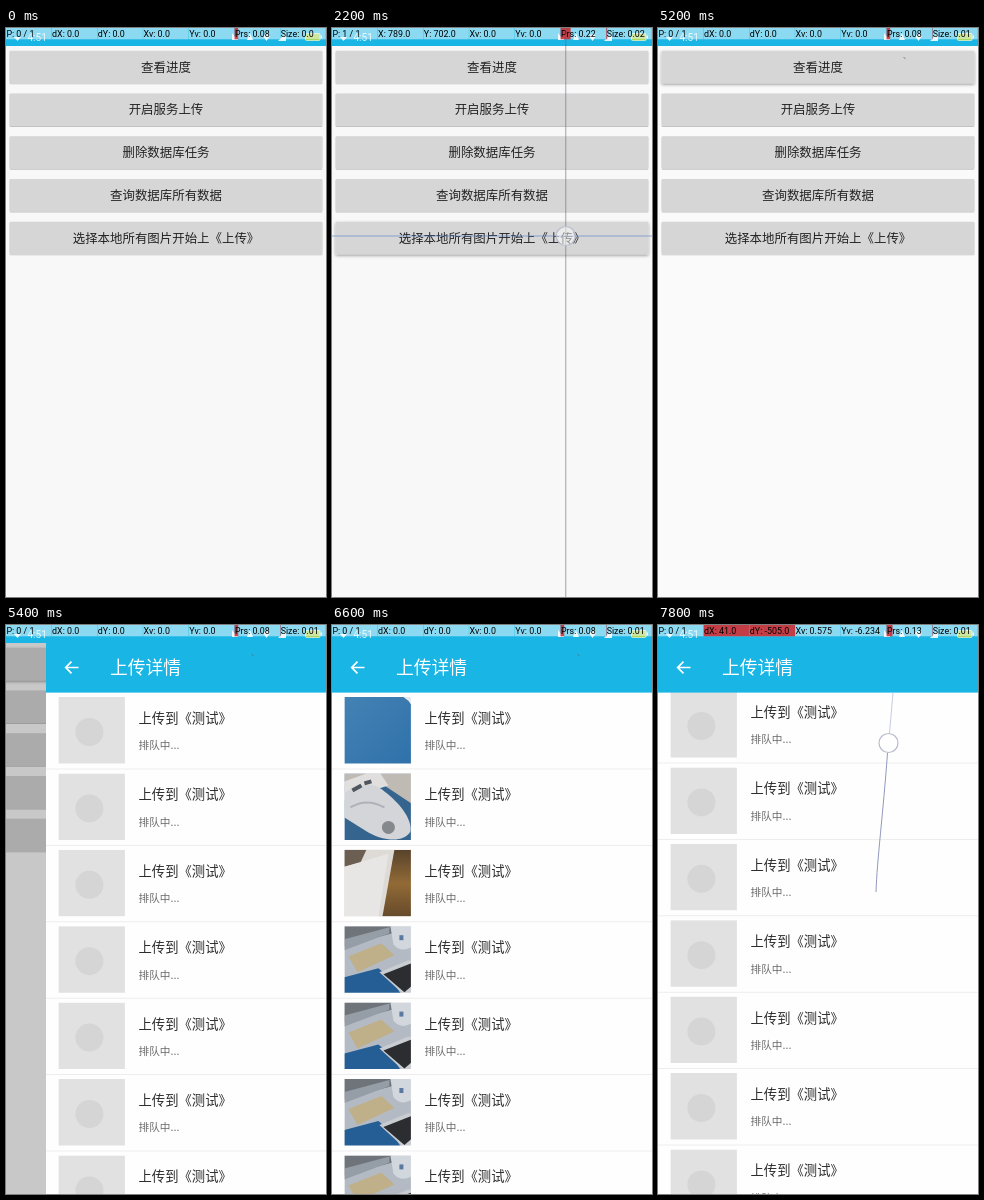
An HTML page for the animation above (8 s loop, 320x569 px).

```html
<!DOCTYPE html>
<html lang="zh-CN">
<head>
<meta charset="utf-8">
<style>
  html, body { margin: 0; width: 100%; height: 100%; overflow: hidden; background: #fafafa; }
  svg { display: block; width: 320px; height: 569px; }
  text { font-family: "Noto Sans CJK SC", "Noto Sans CJK", sans-serif; white-space: pre; }
  .latin { font-family: Roboto, sans-serif; }
  .line { fill: none; stroke: #667; stroke-width: .8; }
</style>
</head>
<body>
<svg viewBox="0 0 320 569">
  <defs>
    <linearGradient id="cloth" x2="1" y2="1">
      <stop stop-color="#4482b4"/><stop offset="1" stop-color="#2f71aa"/>
    </linearGradient>
    <linearGradient id="wood" x2="0" y2="1">
      <stop stop-color="#57432c"/><stop offset=".5" stop-color="#926a36"/><stop offset="1" stop-color="#654a2b"/>
    </linearGradient>
    <filter id="shade" x="-5%" y="-20%" width="110%" height="150%">
      <feDropShadow dx="0" dy=".7" stdDeviation=".6" flood-opacity=".32"/>
    </filter>
    <filter id="raised" x="-5%" y="-20%" width="110%" height="160%">
      <feDropShadow dx="0" dy="1.3" stdDeviation="1.4" flood-opacity=".42"/>
    </filter>
    <filter id="soft"><feGaussianBlur stdDeviation=".7"/></filter>
    <clipPath id="square"><rect width="66.5" height="66.5"/></clipPath>
    <g id="blank"><rect width="67" height="67" fill="#e1e1e1"/><circle cx="31" cy="35" r="14" fill="#d5d5d5"/></g>
    <g id="photo0">
      <rect width="67" height="67" fill="url(#cloth)"/>
      <path d="M59 0H67V8Q64 3 59 0Z" fill="#e6e9ec"/>
    </g>
    <g id="photo1">
      <rect width="67" height="67" fill="#35658f"/>
      <path d="M0 0H67V30L40 12H0Z" fill="#bfbab4"/>
      <path d="M0 8L22 0H36L44 12L0 26Z" fill="#e0dfde"/>
      <path d="M0 20C14 8 30 9 40 18C56 30 68 46 66 58C60 69 40 68 24 59L0 44Z" fill="#d3d5d9"/>
      <path d="M8 17L17 12M20 10L27 8" stroke="#50565e" stroke-width="4"/>
      <path d="M6 34Q22 24 40 34" fill="none" stroke="#aeb2b8" stroke-width="2"/>
      <circle cx="44" cy="54" r="6.500" fill="#85888d"/>
    </g>
    <g id="photo2">
      <rect width="67" height="67" fill="url(#wood)"/>
      <path d="M0 0H50L38 67H0Z" fill="#dedad6"/>
      <path d="M0 0H22L16 13L0 17Z" fill="#6b5e53"/>
      <path d="M0 17L44 4L34 67H0Z" fill="#e8e6e4"/>
    </g>
    <g id="photo3">
      <rect width="67" height="67" fill="#b3bac3"/>
      <path d="M0 0H48V7L0 20Z" fill="#6e7479"/>
      <path d="M0 13L45 1V7L0 24Z" fill="#959da6"/>
      <path d="M0 51L34 42L46 52L56 67H0Z" fill="#245e94"/>
      <path d="M4 30L37 17L50 29L13 46Z" fill="#c0b08a"/>
      <path d="M46 0H67V21Q56 27 49 18Z" fill="#d2d7de"/>
      <path d="M55 9h4v5h-4z" fill="#5a78a0"/>
      <path d="M35 46L64 34L67 35V67H58Z" fill="#c9cdd2"/>
      <path d="M39 48L67 37V60L60 66Z" fill="#2b2d31"/>
    </g>
  </defs>
  <g id="stage"></g>
</svg>
<script>
const LOOP = 8000, STEP = 200, PITCH = 76.4, PX = 320 / 1080;
const CYAN = '#18b5e5';
const stage = document.getElementById('stage');
const buttons = ['查看进度', '开启服务上传', '删除数据库任务', '查询数据库所有数据', '选择本地所有图片开始上《上传》'];

// y is the vertical centre of the glyphs
const label = (str, x, y, size, fill, anchor = 'start') =>
  `<text x="${x}" y="${y + size * .37}" font-size="${size}" fill="${fill}" text-anchor="${anchor}">${str}</text>`;
const rect = (x, y, w, h, fill, extra = '') =>
  `<rect x="${x}" y="${y}" width="${w}" height="${h}" fill="${fill}" ${extra}/>`;

// Finger positions in device pixels
function touchAt(t) {
  if (t === 2200) return { x: 789, y: 702, prs: .22 };
  if (t === 4600) return { x: 831, y: 104, prs: .2 };
  if (t === 7200) return { x: 737, y: 960, prs: .18 };
  if (t === 7600) return { x: 745, y: 800, prs: .16 };
}

function readout(t) {
  const touch = touchAt(t);
  if (touch) return {
    cells: ['P: 1 / 1', `X: ${touch.x}.0`, `Y: ${touch.y}.0`, 'Xv: 0.0', 'Yv: 0.0', `Prs: ${touch.prs.toFixed(2)}`, 'Size: 0.02'],
    levels: [0, 0, 0, 0, 0, touch.prs, .02]
  };
  const flick = (dx, dy, xv, yv, prs, size) => ({
    cells: ['P: 0 / 1', `dX: ${dx}.0`, `dY: ${dy}.0`, `Xv: ${xv}`, `Yv: ${yv}`, `Prs: ${prs}`, `Size: ${size}`],
    levels: [0, Math.abs(dx) > 20, Math.abs(dy) > 20, 0, 0, prs, size]
  });
  if (t === 7400) return flick(-7, -354, '0.186', '-8.852', .17, .02);
  if (t === 7800) return flick(41, -505, '0.575', '-6.234', .13, .01);
  return flick(0, 0, '0.0', '0.0', .08, t < 2200 ? '0.0' : .01);
}

function statusBar(t) {
  const { cells, levels } = readout(t), w = 320 / 7;
  const system = `<g fill="#fff" opacity=".85"><path d="M8 9H15L11.5 13Z"/>
    <path d="M226 12V5L229 9L232 5V12M241 12L244 5L247 12ZM257 8Q260.500 4 264 8L260.500 13ZM272 13L280 5V13Z"/>
    <text class="latin" x="21.500" y="13" font-size="10">4:51</text></g>` +
    rect(299.5, 5.5, 14.5, 7, '#9bd044', 'stroke="#dff0d0" stroke-width=".8" rx="1"') + rect(314.5, 7.5, 1.5, 3, '#dff0d0');
  return system + cells.map((str, i) => {
    const x = i * w;
    return rect(x, 0, w - .3, 11.3, '#fff', 'opacity=".5"') +
      (+levels[i] ? rect(x, 0, levels[i] * w, 11.3, '#d01c22', 'opacity=".82"') : '') +
      `<text class="latin" x="${x + .4}" y="9" font-size="8.890">${str}</text>`;
  }).join('');
}

function home(t) {
  const pressed = t >= 2200 && t < 2800 ? 4 : t >= 4600 && t < 5600 ? 0 : -1;
  return rect(0, 0, 320, 569, t < 2400 ? '#f8f8f9' : '#fafafa') + rect(0, 0, 320, 18, CYAN) +
    buttons.map((str, i) => {
      const y = 22.8 + i * 42.75;
      return rect(3.6, y, 312.8, 32.4, '#d6d6d7', `rx="1" filter="url(#${i === pressed ? 'raised' : 'shade'})"`) +
        label(str, 160, y + 16.2, 12.44, '#222', 'middle');
    }).join('');
}

function list(t) {
  const scroll = t < 7200 ? 0 : { 7200: 15, 7400: 492.8, 7600: 860, 7800: 1152 }[t];
  const loaded = t < 6000 ? 0 : t < 6200 ? 4 : 7;
  const first = Math.floor(scroll / PITCH);
  let out = rect(0, 0, 320, 569, '#fefefe');
  for (let i = first; i < first + 9; i++) {
    const y = 68 + i * PITCH - scroll;
    const thumb = i < loaded ? `<use href="#photo${Math.min(i, 3)}" filter="url(#soft)"/>` : '<use href="#blank"/>';
    out += `<g transform="translate(12.400 ${y + 4})" clip-path="url(#square)">${thumb}</g>` +
      label('上传到《测试》', 92.5, y + 25, 13.33, '#2b2b2b') +
      label('排队中...', 92.5, y + 52.5, 10.67, '#6b6b6b') +
      rect(0, y + 75.6, 320, .8, '#e9e9e9');
  }
  return out + rect(0, 0, 320, 67.6, CYAN) +
    '<path d="M32.500 42.500H20M25.500 36.700L19.700 42.500L25.500 48.300" fill="none" stroke="#fff" stroke-width="1.700"/>' +
    label('上传详情', 64, 42, 17.78, '#fff');
}

const finger = (x, y) =>
  `<circle cx="${x}" cy="${y}" r="9.500" fill="#fff" fill-opacity=".5" stroke="#b9bccb" stroke-width="1.200"/>`;

function pointer(t) {
  const touch = touchAt(t);
  if (touch) {
    const x = touch.x * PX, y = touch.y * PX;
    return `<path class="line" d="M${x} 0V569" stroke-opacity=".75"/>
      <path class="line" d="M0 ${y}H320" style="stroke:#5b82c8" stroke-opacity=".8"/>` + finger(x, y);
  }
  if (t === 7400) return `<path class="line" d="M221.500 307C218 304 218 285 217.700 265L218.500 202"/>
    <path class="line" d="M218.500 202Q219.500 140 222 73" stroke-opacity=".5"/>`;
  if (t === 7800) return `<path class="line" d="M218 267C219 235 225 190 229.500 128" style="stroke:#747fae"/>
    <path class="line" d="M231.500 108L235 68" style="stroke:#747fae" stroke-opacity=".5"/>` + finger(230.5, 118);
  if (t >= 4800 && t < 7200) return '<path class="line" d="M245.500 29L247.500 31"/>';
  return '';
}

function scene(t) {
  let screen;
  if (t < 5400) screen = home(t);
  else if (t < 5600) screen = `<g transform="translate(-10 0)">${home(t)}</g>` +
    rect(0, 0, 320, 569, '#000', 'opacity=".2"') + `<g transform="translate(40 0)">${list(t)}</g>` + rect(0, 0, 320, 18, CYAN);
  else screen = list(t);
  return screen + statusBar(t) + pointer(t);
}

let shown = -1;
function tick() {
  const t = Math.floor(performance.now() % LOOP / STEP) * STEP;
  if (t !== shown) stage.innerHTML = scene(shown = t);
  requestAnimationFrame(tick);
}
tick();
</script>
</body>
</html>
```
